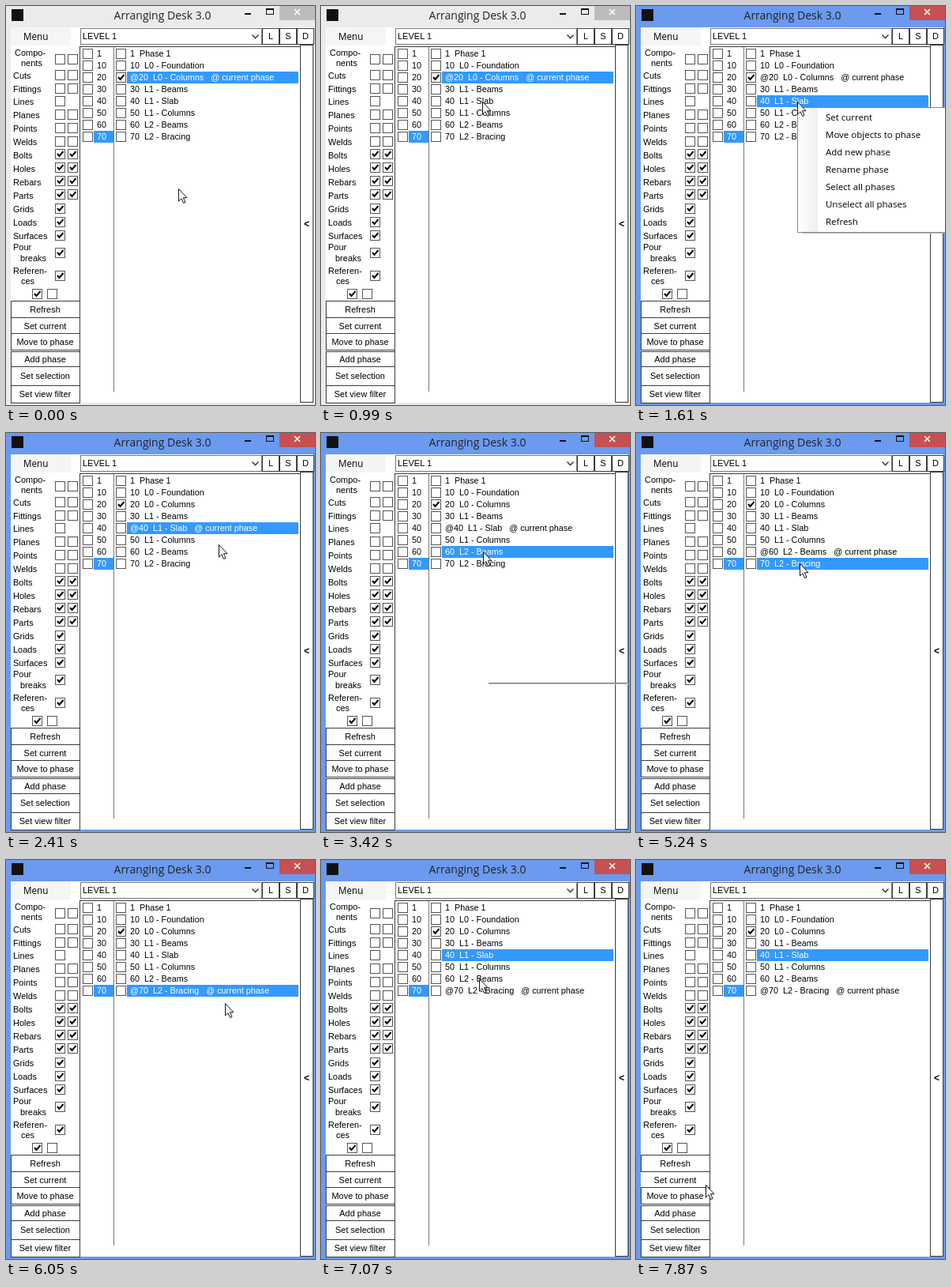
These frames come from a looping animation (391 px wide and 505 px high, 8 s). An HTML page:

```html
<!DOCTYPE html>
<html lang="en">
<head>
<meta charset="utf-8">
<title>Arranging Desk</title>
<style>
html, body { margin: 0; width: 100%; height: 100%; overflow: hidden; background: #fff; }
svg { display: block; }
text { font: 11px "Liberation Sans", Arial, sans-serif; white-space: pre; fill: #000; }
g text { font-size: 10.8px; }
text.ui { font-family: "Open Sans", "Noto Sans", sans-serif; }
rect { shape-rendering: crispEdges; }
</style>
</head>
<body>
<svg id="stage" width="391" height="505" viewBox="0 0 391 505"></svg>
<script>
const LOOP = 8000;
const SELECT = '#3399ff', LINE = '#3c3c3c';
const phases = [['1', 'Phase 1'], ['10', 'L0 - Foundation'], ['20', 'L0 - Columns'], ['30', 'L1 - Beams'],
  ['40', 'L1 - Slab'], ['50', 'L1 - Columns'], ['60', 'L2 - Beams'], ['70', 'L2 - Bracing']];
const pairedParts = ['Cuts', 'Fittings', 'Lines', 'Planes', 'Points', 'Welds', 'Bolts', 'Holes', 'Rebars', 'Parts'];
const singleParts = ['Grids', 'Loads', 'Surfaces'];
const menuItems = ['Set current', 'Move objects to phase', 'Add new phase', 'Rename phase',
  'Select all phases', 'Unselect all phases', 'Refresh'];

// Menu stages
const SHADOW = 1, OPEN = 2, HOVER = 3;
// Each step: time, pointer x and y, then whatever else changes
const steps = [
  [0, 218, 231, { active: false, selected: 2, current: 2, menu: 0, pressed: false }],
  [200, 217, 215], [400, 211, 170], [600, 203, 125], [800, 198, 103], [990, 204, 121],
  [1410, 204, 121, { active: true, selected: 4 }],
  [1610, 204, 121, { menu: OPEN }],
  [1810, 238, 137, { menu: HOVER }],
  [2010, 262, 141],
  [2210, 264, 141, { menu: 0, current: 4 }],
  [2410, 269, 141],
  [2820, 250, 143], [3020, 215, 149],
  [3220, 205, 150, { selected: 6 }],
  [3420, 205, 150, { menu: SHADOW }],
  [3620, 205, 150, { menu: OPEN }],
  [3830, 262, 169, { menu: HOVER }],
  [4030, 266, 168, { menu: 0 }],
  [4230, 266, 167, { current: 6 }],
  [4430, 266, 167],
  [4640, 250, 168], [4840, 220, 166], [5040, 207, 165],
  [5240, 207, 165, { selected: 7 }],
  [5440, 207, 165, { menu: OPEN }],
  [5640, 255, 183, { menu: HOVER }],
  [5850, 277, 184],
  [6050, 277, 181, { menu: 0, current: 7 }],
  [6250, 270, 176], [6450, 245, 150], [6660, 215, 124],
  [6860, 210, 121, { selected: 4 }],
  [7060, 200, 150], [7270, 165, 220], [7470, 137, 281],
  [7670, 80, 402, { pressed: true }],
  [7870, 88, 411]
];

let last = {};
const states = steps.map(([time, x, y, change]) => last = { ...last, ...change, time, x, y });

const fill = (x, y, w, h, color) => `<rect x="${x}" y="${y}" width="${w}" height="${h}" fill="${color}"/>`;
const frame = (x, y, w, h, color = LINE, inside = '#fff') =>
  `<rect x="${x + .5}" y="${y + .5}" width="${w - 1}" height="${h - 1}" fill="${inside}" stroke="${color}"/>`;
const label = (x, y, s, extra = '') => `<text x="${x}" y="${y}" ${extra}>${s}</text>`;
const middle = 'text-anchor="middle"';
const white = 'style="fill:#fff"';
const stroke = (d, color, width) => `<path d="${d}" fill="none" stroke="${color}" stroke-width="${width}"/>`;
const check = (x, y, on) => frame(x, y, 13, 13, '#555') +
  (on ? stroke(`M${x + 3} ${y + 6}l2.5 3 5 -6`, '#000', 2) : '');

function titleBar(active) {
  const edge = active ? '#6b9aee' : '#ebebeb';
  return fill(0, 0, 391, 505, edge) + fill(6, 27, 383, 475, '#fff') +
    fill(7, 4, 15, 15, '#111') +
    label(198, 17, 'Arranging Desk 3.0', `class="ui" style="font-size:14px;fill:#222" ${middle}`) +
    fill(302, 9, 8, 2, '#111') +
    frame(329, 3, 10, 8, '#111', 'none') + fill(329, 3, 10, 2, '#111') +
    fill(346, 0, 45, 18, active ? '#c75050' : '#bcbcbc') +
    stroke('M365 4l7 7m0 -7l-7 7', '#fff', 1.6);
}

function toolbar() {
  return fill(6, 27, 76, 23, '#f5f5f5') +
    label(22, 43, 'Menu', 'class="ui" style="font-size:11.7px"') +
    frame(94, 28, 230, 21, '#777') + label(97, 42, 'LEVEL 1') +
    stroke('M311.5 36.5l4 4 4 -4', '#444', 1.6) +
    ['L', 'S', 'D'].map((s, i) => frame(324 + 22 * i, 28, 22, 21) + label(335 + 22 * i, 42, s, middle)).join('');
}

function sidePanel(pressed) {
  let out = label(11, 63, 'Compo-') + label(19, 76, 'nents') + check(62, 61) + check(78, 61);
  pairedParts.forEach((s, i) => {
    const y = Math.floor(81.3 + 16.75 * i), on = i > 5;
    out += label(9, Math.floor(92.1 + 16.92 * i), s) + check(62, y, on);
    if (s !== 'Lines') out += check(78, y, on);
  });
  singleParts.forEach((s, i) => out += label(9, 261 + 17 * i, s) + check(62, 250 + 17 * i, true));
  out += label(9, 309, 'Pour') + label(18, 323, 'breaks') + check(62, 306, true) +
    label(9, 339, 'Referen-') + label(19, 352, 'ces') + check(62, 335, true) +
    check(33, 358, true) + check(52, 358);
  [['Refresh', 373, 22], ['Set current', 394, 22], ['Move to phase', 414, 22], ['Add phase', 437, 20],
    ['Set selection', 456, 25], ['Set view filter', 480, 23]].forEach(([s, y, h], i) => {
    if (!(pressed && i === 1)) out += frame(6, y, 88, h);
    out += label(49.5, Math.floor(y + h / 2) + 4, s, middle);
  });
  return out;
}

function lists({ selected, current }) {
  let out = fill(93, 51, 1, 437, LINE) + fill(93, 51, 280, 1, LINE) + fill(136, 51, 1, 437, '#777') +
    frame(372, 49, 17, 453) + label(380.5, 280, '&lt;', `${middle} style="font-weight:bold;font-size:12px"`);
  phases.forEach(([number, name], i) => {
    const y = 53 + 15 * i, on = i === selected;
    if (i === 7) out += fill(111, y, 25, 15, SELECT);
    if (on) out += fill(153, y, 217, 15, SELECT);
    out += check(97, y + 1) + check(139, y + 1, i === 2) +
      label(115, y + 11, number, i === 7 ? white : '');
    const line = `${number}  ${name}`;
    out += label(157, y + 11, i === current ? `@${line}   @ current phase` : line, on ? white : '');
  });
  return `<g>${out}</g>`;
}

function popup({ menu, selected }) {
  if (!menu) return '';
  const x = 200 + selected, y = 68 + 15 * selected;
  const shadow = fill(x + 6, y + 158, 200, 1, '#777') + fill(x + 6, y + 159, 200, 1, '#bbb');
  if (menu === SHADOW) return shadow;
  let out = shadow + frame(x, y, 200, 159, '#888') +
    '<linearGradient id="gutter"><stop stop-color="#fff"/><stop offset="1" stop-color="#eee"/></linearGradient>' +
    fill(x + 1, y + 1, 25, 157, 'url(#gutter)');
  if (menu === HOVER) out += frame(x + 2, y + 2, 196, 22, SELECT, '#b3d7f3');
  menuItems.forEach((s, i) => out += label(x + 36, y + 16.5 + 22 * i, s, 'class="ui" style="font-size:11.5px"'));
  return out;
}

const pointer = ({ x, y }) => `<path transform="translate(${x} ${y})" fill="#fff" stroke="#111"
  d="M.5 .5v15.5l3.5 -3.3 2.6 5.8 2.4 -1 -2.6 -5.8h4.6z"/>`;

const stage = document.getElementById('stage');
let shown;
function draw() {
  const time = performance.now() % LOOP;
  const state = states.findLast(s => s.time <= time);
  if (state !== shown) {
    shown = state;
    stage.innerHTML = titleBar(state.active) + toolbar() + sidePanel(state.pressed) +
      lists(state) + popup(state) + pointer(state);
  }
  requestAnimationFrame(draw);
}
draw();
</script>
</body>
</html>
```
